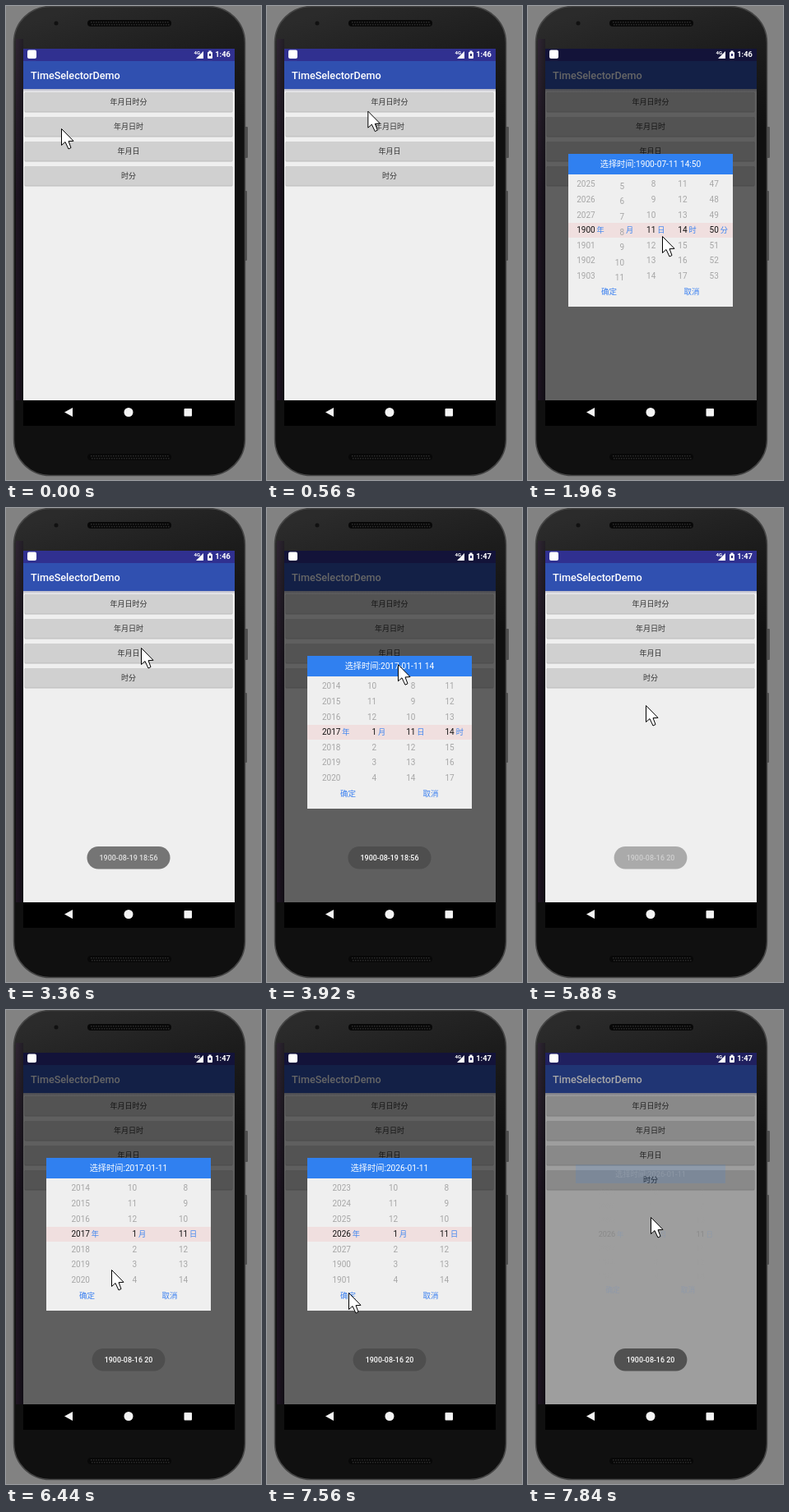
An HTML page with a canvas that plays this animation: 310 px wide and 577 px high, repeating every 8 s.

```html
<!DOCTYPE html>
<html lang="zh">
<head>
<meta charset="utf-8">
<title>TimeSelectorDemo</title>
<style>
html, body { margin: 0; width: 100%; height: 100%; overflow: hidden; background: #828282; }
canvas { display: block; width: 310px; height: 577px; }
</style>
</head>
<body>
<canvas id="stage" width="310" height="577"></canvas>
<script>
const g = document.getElementById('stage').getContext('2d');
const LOOP = 8000, STEP = 280, ROW = 18.6, CX = 149, CY = 273;
const FONT = 'Roboto, "Noto Sans CJK SC", "Noto Sans CJK", sans-serif';
const clamp = v => Math.max(0, Math.min(1, v));

function rect(x, y, w, h, fill, r = 0) {
  g.fillStyle = fill;
  g.beginPath();
  g.roundRect(x, y, w, h, r);
  g.fill();
}

function disc(x, y, r, fill) {
  rect(x - r, y - r, 2 * r, 2 * r, fill, r);
}

function text(str, x, y, size, color, align = 'center', weight = 400) {
  g.font = `${weight} ${size}px ${FONT}`;
  g.textAlign = align;
  g.fillStyle = color;
  g.fillText(str, x, y + size * 0.36);
}

function poly(points, fill) {
  g.beginPath();
  points.forEach(([x, y]) => g.lineTo(x, y));
  g.closePath();
  g.fillStyle = fill;
  g.fill();
}

function gradient(x0, y0, x1, y1, ...colors) {
  const fill = g.createLinearGradient(x0, y0, x1, y1);
  colors.forEach((c, i) => fill.addColorStop(i / (colors.length - 1), c));
  return fill;
}

// Wheel columns: separator before the value, starting value, lowest value, count
const COLS = [
  { unit: '年', sep: '', start: 2017, low: 1900, count: 128 },
  { unit: '月', sep: '-', start: 1, low: 1, count: 12 },
  { unit: '日', sep: '-', start: 11, low: 1, count: 31 },
  { unit: '时', sep: ' ', start: 14, low: 0, count: 24 },
  { unit: '分', sep: ':', start: 50, low: 0, count: 60 }
];
const wrap = (n, { low, count }) => low + (n - low) % count;

// Times in steps; picks are unwrapped, hand is a cursor stop, rest follows closing
const DIALOGS = [
  { open: 4, close: 12, toast: 11.2, picks: [2028, 8, 19, 18, 56], hand: [7, 163, 280], rest: [164, 170] },
  { open: 14, close: 21, toast: 20.55, picks: [2028, 8, 16, 20], hand: [17, 186, 320], rest: [143, 240] },
  { open: 23, close: 28, toast: 28, picks: [2026, 1, 11], hand: [23, 128, 316], rest: [149, 252] }
];

const PATH = [[0, 67, 149]];
DIALOGS.forEach((d, i) => PATH.push(
  [d.open - 1, 150, 117 + 30 * i], d.hand, [d.close - 1, 99, 344], [d.close, ...d.rest]));

// Columns are flicked one after another, each slowing down to its pick
function values(d, s) {
  return d.picks.map((pick, i) => {
    const k = clamp((s - d.open - 1 - i) / 1.75);
    const ease = k < 1 ? 1 - 2 ** (-10 * k) : 1;
    return COLS[i].start + (pick - COLS[i].start) * ease;
  });
}

function stamp(vals) {
  return vals.map((v, i) =>
    COLS[i].sep + String(wrap(Math.floor(v), COLS[i])).padStart(2, '0')).join('');
}

function speaker(y) {
  rect(99, y, 102, 8, '#080808', 4);
  for (let x = 103; x < 198; x += 3) {
    rect(x, y + 2, 1.5, 1.5, '#2c2c2c');
    rect(x + 1, y + 5, 1.5, 1.5, '#2c2c2c');
  }
}

function phone() {
  rect(0, 0, 310, 577, '#828282');
  rect(289, 147, 5, 38, '#505050', 1);
  rect(289, 225, 4, 85, '#505050', 1);
  rect(9.5, 0.5, 281, 571, gradient(90, 0, 150, 190, '#2b2b2b', '#1c1c1c', '#101010'), 44);
  g.lineWidth = 1.5;
  g.strokeStyle = '#444';
  g.stroke();
  rect(12, 40, 9, 440, gradient(12, 0, 21, 0, 'rgba(60,30,70,.35)', 'rgba(20,10,30,.35)'));
  disc(61, 21, 2.5, '#111');
  speaker(17);
  speaker(545);
}

function app() {
  rect(21, 52, 257, 428, '#efefef');
  rect(21, 52, 257, 15, '#303090');
  rect(21, 67, 257, 34, '#3050b0');
  rect(21, 101, 257, 4, gradient(0, 101, 0, 105, '#b8b8c8', '#efefef'));
  text('TimeSelectorDemo', 30, 84.5, 12.65, '#fff', 'left', 500);
  ['年月日时分', '年月日时', '年月日', '时分'].forEach((label, i) => {
    const y = 105 + i * 30;
    rect(22.5, y, 253, 24.5, '#bcbcbc', 1.5);
    rect(23, y, 252, 23.5, '#d0d0d0', 1.5);
    text(label, CX, y + 12, 9, '#333');
  });
}

function statusBar(s) {
  rect(26, 53.5, 11, 10.5, '#fff', 2);
  text('4G', 228.5, 57, 6, '#fff', 'left', 700);
  poly([[240, 55], [240, 64], [231, 64]], '#fff');
  rect(245, 56, 6, 8, '#fff', 1);
  rect(246.5, 54.5, 3, 2, '#fff');
  rect(247, 58, 2, 3, '#303070');
  text(s < 14 ? '1:46' : '1:47', 263.5, 59, 9.3, '#fff', 'center', 700);
}

function navBar() {
  rect(21, 480, 257, 31, '#000');
  poly([[71, 494.5], [81, 489], [81, 500]], '#f4f4f4');
  disc(CX, 494.5, 5.5, '#f4f4f4');
  rect(216.5, 490, 9.5, 9.5, '#f4f4f4', 1);
}

function wheel(v, right, col) {
  const mid = Math.round(v);
  for (let n = mid - 3; n <= mid + 3; n++) {
    const label = wrap(n + col.count, col);
    text(label, right, 272.6 + (n - v) * ROW, 10, n === v ? '#111' : '#a6a6a6', 'right');
  }
  text(col.unit, right + 6.5, 272.6, 9.2, '#3c84f0');
}

function dialog(d, s, alpha, scale) {
  const vals = values(d, s), gap = 200 / (vals.length + 0.23);
  g.save();
  g.translate(CX, CY);
  g.scale(scale, scale);
  g.translate(-CX, -CY);
  g.globalAlpha = alpha ** 3;
  rect(49, 180, 200, 186, '#efefef');
  rect(49, 264, 200, 18, '#f0dfdf');
  g.globalAlpha = alpha;
  rect(49, 180, 200, 25, '#3080f0');
  text('选择时间:' + stamp(vals), CX, 192.7, 10.2, '#fff');
  vals.forEach((v, i) => {
    const right = 249 - gap * (vals.length - 0.55 - i - (i ? 0 : 0.075));
    wheel(v, right, COLS[i]);
  });
  text('确定', 98.5, 347.5, 9.5, '#3c80f0');
  text('取消', 199, 347.5, 9.5, '#3c80f0');
  g.restore();
}

function toast(d, s) {
  const age = s - d.toast;
  const label = stamp(d.picks);
  g.save();
  g.globalAlpha = clamp(age) * clamp(9 - age);
  g.font = `9px ${FONT}`;
  const w = g.measureText(label).width + 31;
  rect(CX - w / 2, 412, w, 27.5, 'rgba(77,77,77,.94)', 13.75);
  text(label, CX, 426, 8.9, '#fff', 'center', 500);
  g.restore();
}

function cursor(s) {
  const i = PATH.findLastIndex(p => p[0] <= s);
  const [s0, x0, y0] = PATH[i], [s1, x1, y1] = PATH[i + 1] || [s0 + 1, x0, y0];
  const k = (s - s0) / (s1 - s0);
  g.save();
  g.translate(x0 + (x1 - x0) * k + 0.5, y0 + (y1 - y0) * k + 0.5);
  poly([[0, 0], [0, 20], [4.5, 16], [8.5, 24.5], [11.5, 23], [8.5, 15.2], [14.5, 14.8]], '#fff');
  g.lineWidth = 1;
  g.strokeStyle = '#000';
  g.stroke();
  g.restore();
}

function draw() {
  const s = Math.floor(performance.now() % LOOP / STEP);
  const d = DIALOGS.find(d => s >= d.open && s < d.close);
  const leaving = s === DIALOGS[2].close;
  phone();
  app();
  if (d || leaving) rect(21, 52, 257, 428, `rgba(0,0,0,${d ? 0.6 : 0.34})`);
  statusBar(s);
  if (d) dialog(d, s, 1, 1);
  if (leaving) dialog(DIALOGS[2], s, 0.14, 0.91);
  DIALOGS.forEach(d => toast(d, s));
  navBar();
  cursor(s);
  requestAnimationFrame(draw);
}
draw();
</script>
</body>
</html>
```
